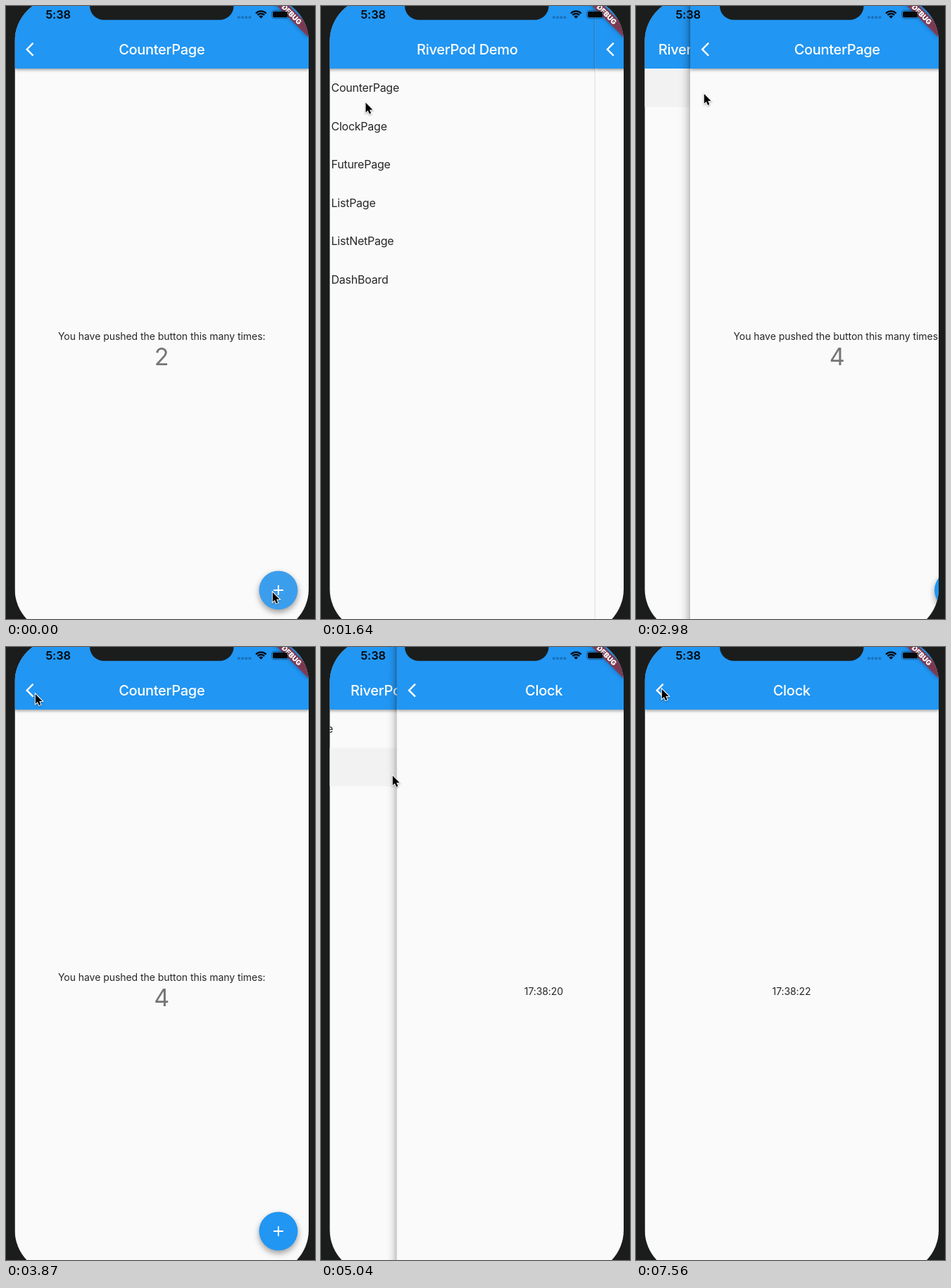
These frames come from a looping animation (439 by 872 pixels, 8 s). An HTML page with a canvas:

```html
<!DOCTYPE html>
<html lang="en">
<head>
<meta charset="utf-8">
<title>Page navigation demo</title>
<style>
html, body { margin: 0; width: 100%; height: 100%; overflow: hidden; background: #1b1d1c; }
canvas { display: block; width: 439px; height: 872px; }
</style>
</head>
<body>
<canvas id="stage"></canvas>
<script>
const LOOP = 8000, BEAT = 148.15;          // the screen refreshes once per beat
const STAGE_W = 439, STAGE_H = 872;
const LEFT = 12.5, TOP = -12, W = 417.5, H = 903.5;
const BAR_BOTTOM = 89, ROW_H = 54.6;
const BLUE = '#2196f3', PAPER = '#fafafa', BODY = '#1b1d1c';
const ROWS = ['CounterPage', 'ClockPage', 'FuturePage', 'ListPage', 'ListNetPage', 'DashBoard'];
const SLIDE = 300 / BEAT;

// Pushes and pops, in beats
const MOVES = [
  { at: 10.05, page: 'counter', dir: -1 },
  { at: 19.2, page: 'counter', dir: 1, row: 0 },
  { at: 27.2, page: 'counter', dir: -1 },
  { at: 33.325, page: 'clock', dir: 1, row: 1 }
];

// Pointer stops: beat, x, y
const POINTER = [
  [0, 378, 833], [3, 378, 833], [7, 48, 82], [9, 35, 64], [10, 35, 64],
  [13, 142, 344], [17, 96, 124], [21, 96, 124], [26, 41, 66], [28, 41, 66],
  [32, 101, 182], [43, 101, 182], [44, 82, 120], [51, 36, 59]
];

const canvas = document.getElementById('stage');
const ctx = canvas.getContext('2d');
const ratio = window.devicePixelRatio || 1;
canvas.width = STAGE_W * ratio;
canvas.height = STAGE_H * ratio;

const clamp = v => Math.min(1, Math.max(0, v));
const smooth = v => v * v * (3 - 2 * v);

function bezier(x1, y1, x2, y2) {
  const at = (a, b, u) => 3 * u * (1 - u) ** 2 * a + 3 * u * u * (1 - u) * b + u ** 3;
  return x => {
    let lo = 0, hi = 1;
    for (let i = 0; i < 24; i++) {
      const mid = (lo + hi) / 2;
      if (at(x1, x2, mid) < x) lo = mid; else hi = mid;
    }
    return at(y1, y2, (lo + hi) / 2);
  };
}
const slideEase = bezier(0.35, 0.91, 0.33, 0.97);

function text(str, x, y, size, color, { weight = 400, align = 'center', spacing = 0 } = {}) {
  ctx.font = `${weight} ${size}px Inter, Roboto, sans-serif`;
  ctx.letterSpacing = spacing + 'px';
  ctx.textAlign = align;
  ctx.textBaseline = 'alphabetic';
  ctx.fillStyle = color;
  ctx.fillText(str, x, y);
}

function box(x, y, w, h, color, r = 0) {
  ctx.fillStyle = color;
  ctx.beginPath();
  ctx.roundRect(x, y, w, h, r);
  ctx.fill();
}

function line(points, width, color) {
  ctx.beginPath();
  points.forEach(([x, y]) => ctx.lineTo(x, y));
  ctx.lineWidth = width;
  ctx.strokeStyle = color;
  ctx.stroke();
}

function shadow(color, blur, dy) {
  ctx.shadowColor = color;
  ctx.shadowBlur = blur * ratio;
  ctx.shadowOffsetY = dy * ratio;
}

function page(title, back) {
  box(LEFT, TOP, W, H, PAPER);
  ctx.save();
  shadow('rgba(0,0,0,.36)', 4, 1.5);
  box(LEFT, TOP, W, BAR_BOTTOM - TOP, BLUE);
  ctx.restore();
  text(title, LEFT + W / 2, 68.6, 20, '#fff', { weight: 500, spacing: -0.3 });
  if (back) line([[38.6, 52.7], [29.7, 61.7], [38.6, 70.7]], 2.4, '#fff');
}

function home(activeRow) {
  page('RiverPod Demo', false);
  if (activeRow >= 0) box(LEFT, BAR_BOTTOM + activeRow * ROW_H, W, ROW_H, '#f2f2f2');
  ROWS.forEach((name, i) =>
    text(name, 28, 122 + i * ROW_H, 16, '#272727', { align: 'left', spacing: -0.25 }));
}

function counter(beat) {
  page('CounterPage', true);
  const count = beat < 1 ? 2 : beat < 3 ? 3 : 4;
  text('You have pushed the button this many times:', 221.2, 475, 14, '#272727', { spacing: -0.05 });
  text(count, 221.2, 510.5, 34, '#757575');
  ctx.save();
  shadow('rgba(0,0,0,.38)', 9, 4);
  box(359.5, 803.5, 55, 55, beat < 4 ? '#3b9eed' : BLUE, 27.5);
  ctx.restore();
  line([[380, 831], [394, 831]], 2, '#fff');
  line([[387, 824], [387, 838]], 2, '#fff');
}

function clock(beat) {
  page('Clock', true);
  const second = beat < 40 ? 20 : beat < 47 ? 21 : 22;
  text('17:38:' + second, 221, 494.8, 14, '#272727', { spacing: -0.1 });
}

function shifted(dx, draw) {
  ctx.save();
  ctx.translate(dx, 0);
  draw();
  ctx.restore();
}

// Soft dark strip on the leading edge of a sliding page
function edgeShade(x, width) {
  const g = ctx.createLinearGradient(x - width, 0, x, 0);
  [[0, 0], [0.3, 0.016], [0.6, 0.07], [1, 0.22]].forEach(([stop, a]) =>
    g.addColorStop(stop, `rgba(0,0,0,${a})`));
  ctx.fillStyle = g;
  ctx.fillRect(x - width, TOP, width, H);
}

function pages(beat) {
  const move = MOVES.filter(m => m.at <= beat).pop();
  const eased = move ? slideEase(clamp((beat - move.at) / SLIDE)) : 1;
  const shown = !move ? 1 : move.dir > 0 ? eased : 1 - eased;
  const cover = W * (1 - shown);
  if (shown < 0.999) {
    const row = move && move.dir > 0 ? move.row : -1;
    shifted(-shown * W / 3, () => home(row));
  }
  if (shown > 0.001) {
    if (shown < 0.999) edgeShade(LEFT + cover, W * 0.05 * shown);
    shifted(cover, () => move && move.page === 'clock' ? clock(beat) : counter(beat));
  }
}

function banner() {
  ctx.save();
  ctx.translate(LEFT + W, TOP);
  ctx.rotate(Math.PI / 4);
  ctx.save();
  shadow('rgba(0,0,0,.5)', 6, 0);
  box(-40, 28, 80, 12.2, 'rgba(183,28,28,.63)');
  ctx.restore();
  text('DEBUG', 0, 37.8, 10.2, '#fff', { weight: 900, spacing: -0.1 });
  ctx.restore();
}

function wifi(x, y) {
  const a = Math.PI * 0.25;
  ctx.strokeStyle = '#05080c';
  ctx.lineWidth = 2.3;
  [10.4, 6.9].forEach(r => {
    ctx.beginPath();
    ctx.arc(x, y, r, -Math.PI / 2 - a, -Math.PI / 2 + a);
    ctx.stroke();
  });
  ctx.fillStyle = '#05080c';
  ctx.beginPath();
  ctx.moveTo(x, y);
  ctx.arc(x, y, 4.2, -Math.PI / 2 - a, -Math.PI / 2 + a);
  ctx.fill();
}

function statusBar() {
  text('5:38', 74, 18, 16.5, '#05080c', { weight: 600, spacing: -0.2 });
  for (let i = 0; i < 4; i++) box(329 + i * 5.2, 14.5, 3.6, 3.4, 'rgba(10,40,80,.34)', 0.8);
  wifi(362.3, 17.8);
  ctx.strokeStyle = 'rgba(5,8,12,.4)';
  ctx.lineWidth = 1;
  ctx.beginPath();
  ctx.roundRect(377.5, 6.2, 24, 11.6, 3.4);
  ctx.stroke();
  box(379, 7.7, 21, 8.6, '#05080c', 2);
}

function notch() {
  box(119, -40, 204.5, 59.8, BODY, 20);
}

function pointer(beat) {
  let i = POINTER.findIndex(p => p[0] > beat);
  if (i < 0) i = POINTER.length;
  const from = POINTER[i - 1], to = POINTER[i] || from;
  const k = to === from ? 0 : smooth((beat - from[0]) / (to[0] - from[0]));
  ctx.save();
  ctx.translate(from[1] + (to[1] - from[1]) * k, from[2] + (to[2] - from[2]) * k);
  ctx.beginPath();
  [[0.8, 1], [0.8, 14.8], [3.9, 12], [6, 17], [8.4, 16], [6.3, 11.1], [10.6, 10.9]]
    .forEach(([x, y]) => ctx.lineTo(x, y));
  ctx.closePath();
  ctx.lineJoin = 'miter';
  ctx.lineWidth = 2;
  ctx.strokeStyle = '#fff';
  ctx.save();
  shadow('rgba(0,0,0,.35)', 2, 1);
  ctx.stroke();
  ctx.restore();
  ctx.fillStyle = '#000';
  ctx.fill();
  ctx.restore();
}

function draw(ms) {
  const beat = Math.floor((ms % LOOP) / BEAT);
  ctx.setTransform(ratio, 0, 0, ratio, 0, 0);
  box(0, 0, STAGE_W, STAGE_H, BODY);
  ctx.save();
  ctx.beginPath();
  ctx.roundRect(LEFT, TOP, W, H, 62);
  ctx.clip();
  pages(beat);
  banner();
  statusBar();
  ctx.restore();
  notch();
  pointer(beat);
}

const start = performance.now();
function tick() {
  draw(performance.now() - start);
  requestAnimationFrame(tick);
}
tick();
</script>
</body>
</html>
```
